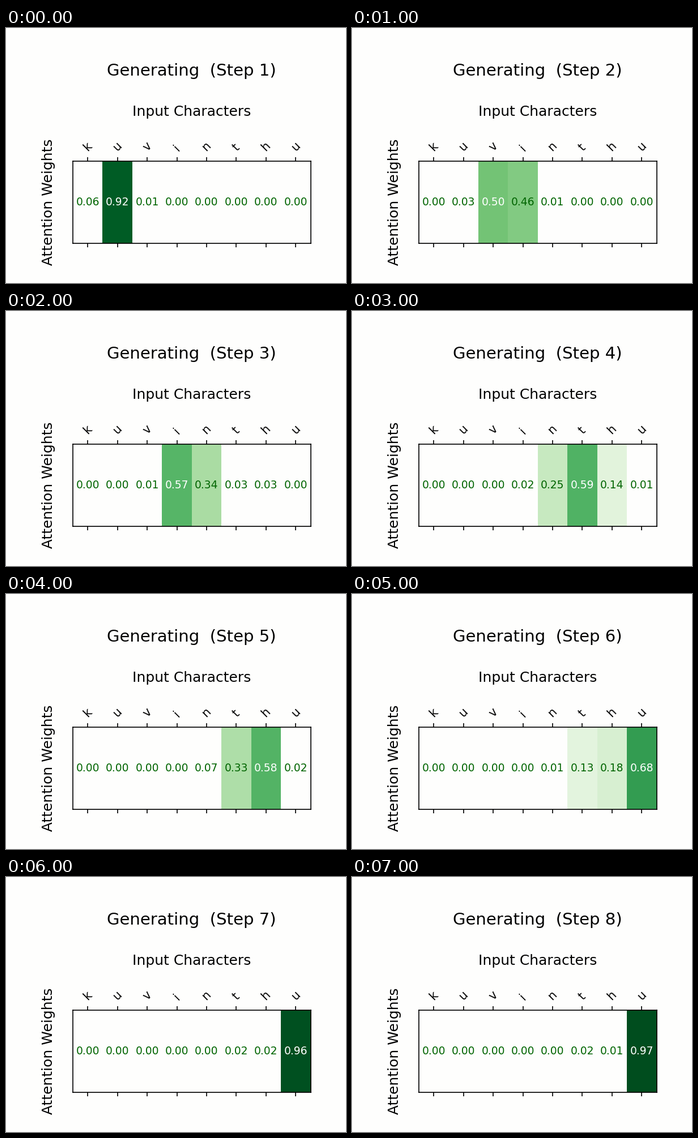
A matplotlib script for the animation above (8000 ms loop, 600 by 450 pixels).

```python
import matplotlib.pyplot as plt
import numpy as np
from matplotlib.animation import FuncAnimation

DPI = 150
W, H = 600, 450
PAPER = "#fefefd"
CHARS = "kuvinthu"
N = len(CHARS)

# Per step: first attended character and the weights from there on
FOCUS = [
    (1, [.924]),
    (2, [.50, .46]),
    (3, [.572, .344, .034, .034]),
    (4, [.249, .587, .137]),
    (5, [.33, .58]),
    (5, [.13, .18, .68]),
    (5, [.02, .02, .96]),
    (5, [.02, .01, .97]),
]
LOOK_BACK = 0.81  # share of the leftover attention that falls behind


def attention(step):
    """Focus weights, with the leftover leaking to both neighbours."""
    start, peak = FOCUS[step]
    end = start + len(peak)
    rest = max(0, 1 - sum(peak))
    row = np.zeros(N)
    row[start:end] = peak
    row[start - 1] = rest * LOOK_BACK
    if end < N:
        row[end] = rest * (1 - LOOK_BACK)
    return row


def tint(row):
    """Leave weights too faint to colour their cell blank."""
    return np.ma.masked_less(row, 0.1)[None, :]


plt.rcParams["font.family"] = "DejaVu Sans"
fig = plt.figure(figsize=(W / DPI, H / DPI), dpi=DPI, facecolor=PAPER)

left, right, top, bottom = 118, 537.5, 235, 380.2
ax = fig.add_axes([left / W, 1 - bottom / H,
                   (right - left) / W, (bottom - top) / H], facecolor=PAPER)

cmap = plt.get_cmap("Greens").copy()
cmap.set_bad(PAPER)
image = ax.imshow(tint(attention(0)), cmap=cmap, vmin=0, vmax=1,
                  aspect="auto", interpolation="nearest")

ax.set_yticks([])
ax.set_xticks(range(N), list(CHARS), rotation=45, fontsize=10)
ax.tick_params(axis="x", top=True, bottom=True,
               labeltop=True, labelbottom=False)
ax.xaxis.set_label_position("top")
ax.set_xlabel("Input Characters", fontsize=12, labelpad=20)
ax.set_ylabel("Attention Weights", fontsize=12, labelpad=15)

title = fig.text((left + right) / 2 / W, 1 - 84 / H, "", fontsize=14,
                 ha="center", va="baseline")
values = [ax.text(i, 0, "", fontsize=9, ha="center", va="center")
          for i in range(N)]


def update(step):
    row = attention(step)
    image.set_data(tint(row))
    title.set_text(f"Generating  (Step {step + 1})")
    for label, w in zip(values, row):
        label.set_text(f"{w:.2f}")
        label.set_color("white" if w >= 0.5 else "darkgreen")
    return [image, title, *values]


anim = FuncAnimation(fig, update, frames=len(FOCUS), interval=1000,
                     repeat=True, repeat_delay=0, blit=False)
plt.show()
```
